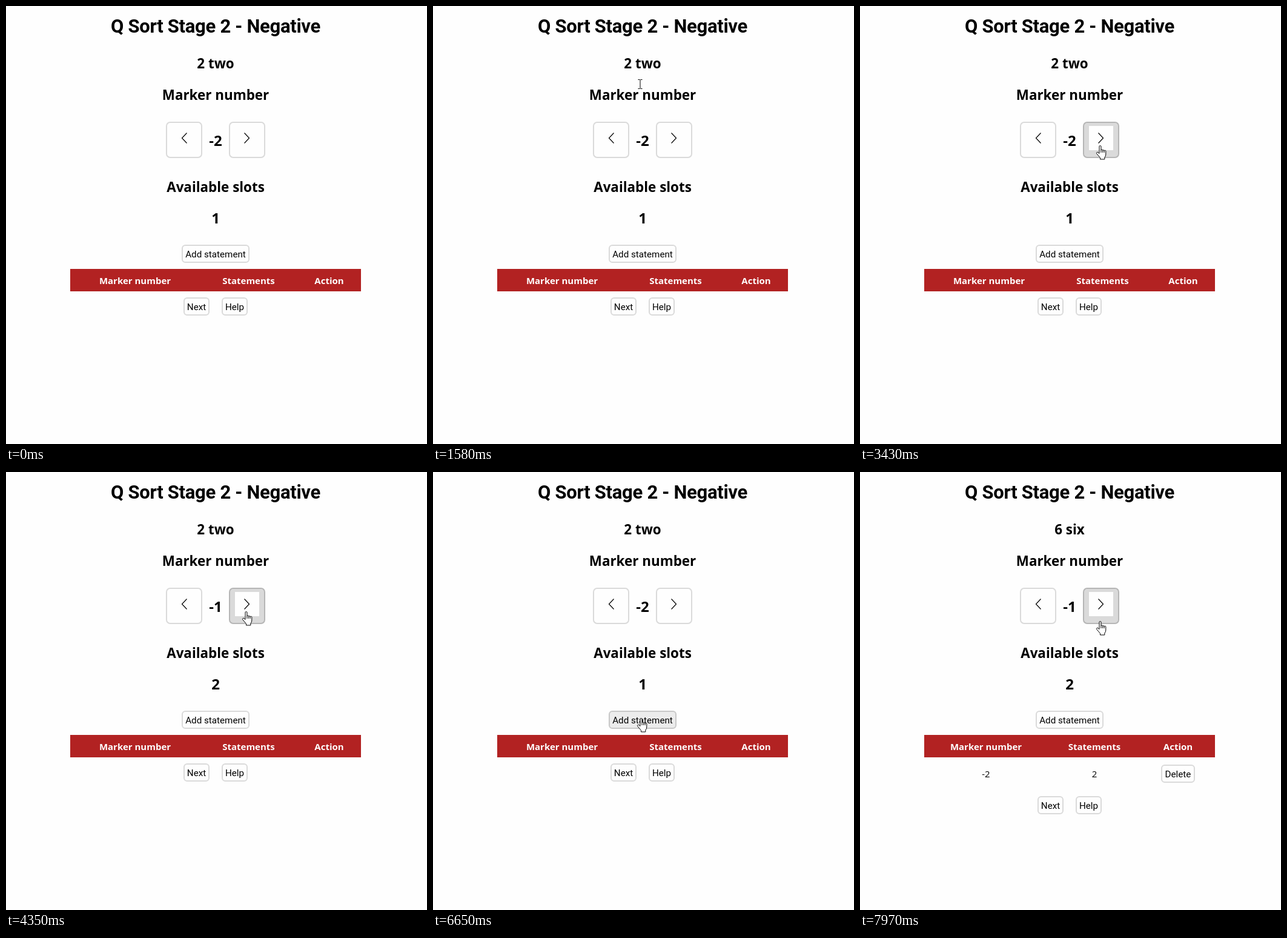
Write an HTML page that moves like this. It is 695 px wide and 723 px high and loops after 8000 ms.

```html
<!DOCTYPE html>
<html lang="en">
<head>
<meta charset="utf-8">
<title>Q Sort</title>
<style>
  html, body { margin: 0; width: 100%; height: 100%; overflow: hidden; background: #fefefe; }
  svg { display: block; width: 695px; height: 723px; cursor: default; }
  text { text-anchor: middle; font: 700 22.4px "Open Sans", "Noto Sans", sans-serif; }
  .title { font: 700 31px Roboto, sans-serif; letter-spacing: -.3px; }
  .number { font-size: 24px; }
  .label { font: 400 15.2px Roboto, sans-serif; }
  .head { font-size: 15px; fill: #fff; }
  .cell { font-size: 15px; font-weight: 400; }
  .box { fill: #fefefe; stroke: #dadada; stroke-width: 2; }
  .line { fill: none; stroke: #000; stroke-width: 1.2; }
  #cursor path { fill: #fff; stroke: #000; }
</style>
</head>
<body>
<svg viewBox="0 0 695 723">
  <text class="title" x="346" y="43.5">Q Sort Stage 2 - Negative</text>
  <text class="prose" id="statement" x="346" y="103"></text>
  <text class="prose" x="346" y="155">Marker number</text>
  <text class="number" id="marker" x="346" y="231"></text>
  <text class="prose" x="346" y="307">Available slots</text>
  <text class="number" id="slots" x="346" y="359"></text>

  <rect class="box" x="265" y="192" width="58" height="58" rx="6"/>
  <path class="line" d="M298.5 209.5l-8 8.5 8 8.5"/>
  <rect class="box" id="right" x="369" y="192" width="58" height="58" rx="6"/>
  <path fill="#fefefe" d="M378 198h40v40h-40z"/>
  <path class="line" d="M393.5 209.5l8 8.5-8 8.5"/>

  <rect class="box" id="add" x="291" y="395" width="110" height="28" rx="5"/>
  <text class="label" x="346" y="415">Add statement</text>

  <path fill="#b22222" d="M106 434h480v37H106z"/>
  <g id="empty">
    <text class="head" x="213" y="459">Marker number</text>
    <text class="head" x="400.5" y="459">Statements</text>
    <text class="head" x="533.5" y="459">Action</text>
  </g>
  <g id="filled">
    <text class="head" x="208" y="459">Marker number</text>
    <text class="head" x="387" y="459">Statements</text>
    <text class="head" x="525" y="459">Action</text>
    <text class="cell" x="208" y="504">-2</text>
    <text class="cell" x="387" y="504">2</text>
    <rect class="box" x="498" y="484" width="54" height="28" rx="5"/>
    <text class="label" x="525" y="504">Delete</text>
  </g>
  <g id="footer">
    <rect class="box" x="294" y="482" width="41" height="28" rx="5"/>
    <text class="label" x="314.5" y="502">Next</text>
    <rect class="box" x="357" y="482" width="41" height="28" rx="5"/>
    <text class="label" x="377.5" y="502">Help</text>
  </g>

  <g id="cursor">
    <path id="arrow" d="M.5.5V16.5L4.2 13 6.6 18.5 9 17.4 6.7 12.2H11.8Z"/>
    <path id="beam" d="M-3.5-7.5h3m1 0h3M-3.5 7.5h3m1 0h3M0-7V7"/>
    <path id="hand" transform="translate(-5.5)" d="M5.5 13.5V2a1.5 1.5 0 0 1 3 0V8a1.4 1.4 0 0 1 2.7 0v.6a1.3 1.3 0 0 1 2.5.2v.6a1.3 1.3 0 0 1 2.6.3V15q0 3-2 5v3H7v-2.5L1.2 13.6a1.5 1.5 0 0 1 2.3-1.9ZM8.5 8v4M11.2 8.6v3.4M13.7 9.4v2.6"/>
  </g>
</svg>
<script>
const LOOP = 8000, ENTER = 330, ADD_CLICK = 6850, FADE = 200;
const RIGHT_CLICKS = [3490, 3890, 4280, 5140, 7930];

// Where the pointer turns or rests: time, x, y
const PATH = [
  [ENTER, 501, 612], [1120, 370, 290], [1580, 342, 129],
  [1840, 322, 96], [2140, 322, 96], [2570, 381, 127],
  [3160, 395, 230], [6100, 395, 230],
  [6600, 342, 406], [7340, 342, 406], [7380, 344, 375],
  [7750, 395, 246], [LOOP, 395, 246]
];

const $ = id => document.getElementById(id);
const prose = [...document.querySelectorAll('.prose')];
const buttons = [$('right'), $('add')];
const show = (id, on) => $(id).style.display = on ? '' : 'none';

function over([x, y], shape, pad) {
  const b = shape.getBBox();
  return Math.abs(x - b.x - b.width / 2) <= b.width / 2 + pad
      && Math.abs(y - b.y - b.height / 2) <= b.height / 2 + pad;
}

function pointer(t) {
  const i = Math.max(1, PATH.findIndex(key => key[0] > t));
  const [t0, x0, y0] = PATH[i - 1], [t1, x1, y1] = PATH[i];
  const k = Math.max(0, (t - t0) / (t1 - t0));
  return [x0 + (x1 - x0) * k, y0 + (y1 - y0) * k];
}

// Hover shade follows the share of the last moments spent over the button
function shade(button, t) {
  const steps = 10;
  let level = 0;
  for (let k = 0; k < steps; k++) level += over(pointer(t - k * FADE / steps), button, 1) / steps;
  const grey = base => `rgb(${Array(3).fill(Math.round(base - 36 * level))})`;
  button.style.fill = grey(254);
  button.style.stroke = grey(218);
}

function draw(t) {
  const added = t >= ADD_CLICK;
  const first = RIGHT_CLICKS.filter(c => c <= t).length % 2;
  $('statement').textContent = added ? '6 six' : '2 two';
  $('marker').textContent = first ? '-1' : '-2';
  $('slots').textContent = first ? 2 : added ? 0 : 1;

  show('empty', !added);
  show('filled', added);
  $('footer').setAttribute('transform', `translate(0 ${added ? 54 : 0})`);
  buttons.forEach(button => shade(button, t));

  const p = pointer(t);
  const hand = buttons.some(button => over(p, button, 1));
  const beam = !hand && prose.some(text => over(p, text, 2.5));
  show('cursor', t >= ENTER);
  show('hand', hand);
  show('beam', beam);
  show('arrow', !hand && !beam);
  $('cursor').setAttribute('transform', `translate(${p.map(Math.round)})`);
}

const start = performance.now();
function tick() {
  draw((performance.now() - start) % LOOP);
  requestAnimationFrame(tick);
}
tick();
</script>
</body>
</html>
```
